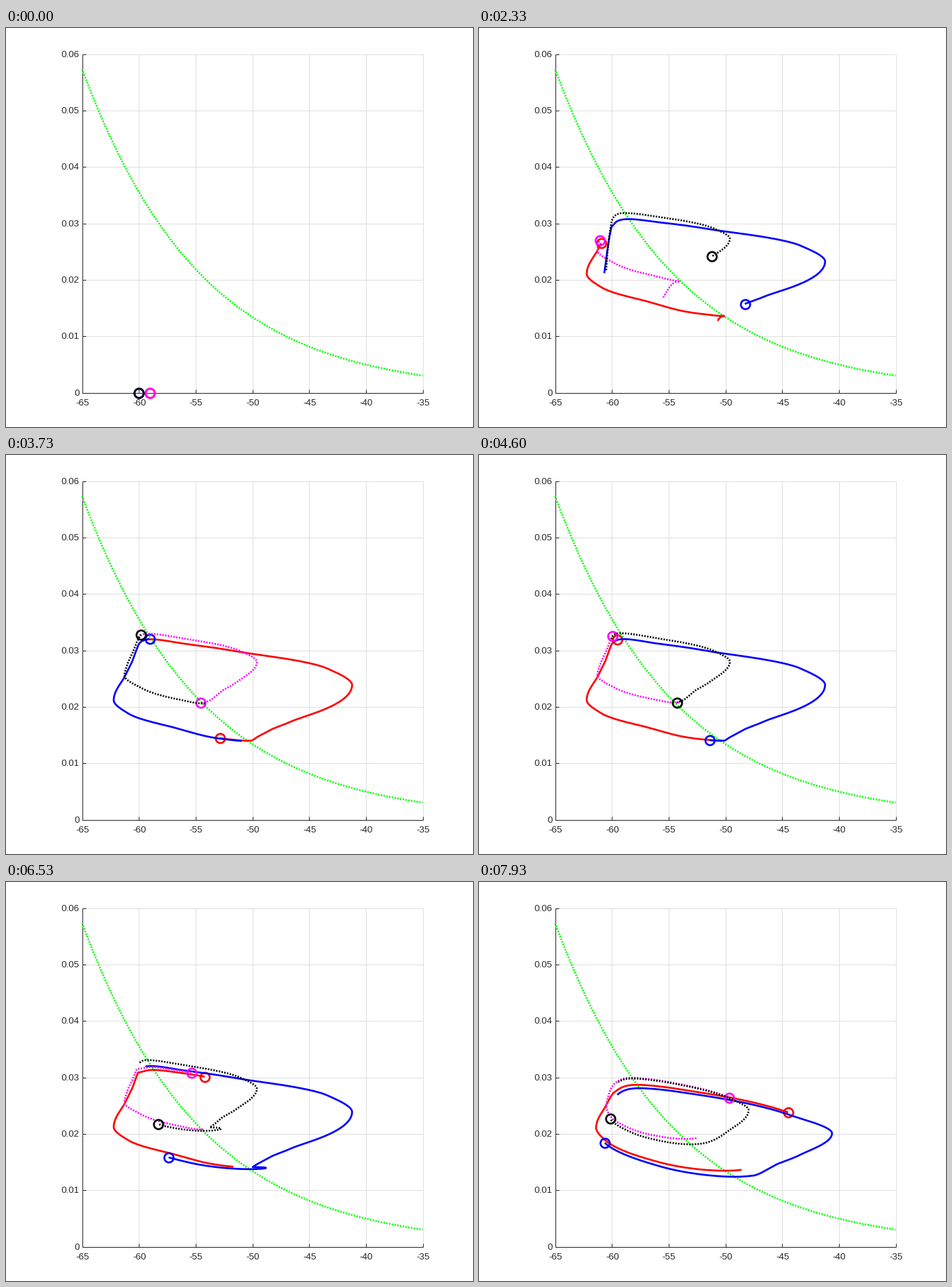
A matplotlib script that plays this animation: 672 by 575 pixels, repeating every 8000 ms.

```python
import math
import numpy as np
import matplotlib.pyplot as plt
from matplotlib.animation import FuncAnimation

W, H, DPI = 672, 575, 100
PX = 72 / DPI                 # one pixel in points
STEPS, STILL, HOLD = 120, 13, 3
SUB = 40                      # samples per step
TRAIL = 15                    # steps kept visible
FIRST, HALF = 13.2, 13.8      # first role swap, time between swaps
KICK, LATE, FAST = 81.4, 90.4, 10.1
TAU = 21                      # time scale of the slow variable
INK, GRID = "#262626", "#dfdfdf"
LEFT, RIGHT, TOP, BOTTOM = 109.5, 599.5, 37.5, 525.5


def px(v):
    return LEFT + (RIGHT - LEFT) * (v + 65) / 30


def py(h):
    return BOTTOM - (BOTTOM - TOP) * h / .06


def volts(x):
    return (x - LEFT) * 30 / (RIGHT - LEFT) - 65


def rest(v):
    """Resting level of the slow variable: the green curve."""
    return 1 / (1 + np.exp((v + 93) / 10))


def ease(*keys):
    """Monotone cubic easing through (time, x) keys."""
    t, x = np.array(keys, float).T
    h, d = np.diff(t), np.diff(x) / np.diff(t)
    m = np.zeros(len(t))
    m[0], m[-1] = d[0], d[-1]
    for i in range(1, len(d)):
        if d[i - 1] * d[i] > 0:
            m[i] = 2 * d[i - 1] * d[i] / (d[i - 1] + d[i])

    def at(s):
        i = min(max(int(np.searchsorted(t, s, side="right")) - 1, 0), len(h) - 1)
        u = min(max((s - t[i]) / h[i], 0), 1)
        v = 1 - u
        return ((1 + 2 * u) * v * v * x[i] + u * v * v * h[i] * m[i]
                + u * u * (3 - 2 * u) * x[i + 1] - u * u * v * h[i] * m[i + 1])
    return at


# Only the horizontal motion is keyed; the height follows from the slow variable.
SOLID = dict(
    ring=48,
    lead=ease((0, 207), (.2, 226), (1.1, 234), (2.6, 253), (3.8, 299),
              (4.3, 328), (5.4, 340), (FIRST, 351)),
    lag=ease((0, 191), (.2, 216), (1.7, 215), (2.6, 208), (4.6, 180),
             (5.3, 177.5), (8, 182.5), (FIRST, 191)),
    active=ease((0, 192), (1.4, 199), (2.6, 212), (4, 246), (4.9, 330), (5.6, 462),
                (6.1, 498), (7.8, 412), (8.9, 381), (11, 361), (HALF, 353)),
    passive=ease((0, 353), (1.4, 332), (2.7, 290), (4, 245), (5.3, 176),
                 (6.2, 155), (8.1, 171), (10, 182), (HALF, 192)),
    late_active=ease((0, 193), (1.9, 213), (3, 234), (4.1, 290), (5.5, 445),
                     (6.2, 508), (7.2, 463), (8.1, 427), (FAST, 396)),
    late_passive=ease((0, 396), (1.3, 355), (3.4, 262), (5.5, 181),
                      (6.4, 168.5), (8.3, 182), (FAST, 193)))

DOTTED = dict(
    ring=9,
    lead=ease((0, 207), (1.4, 210), (3.3, 238), (6.3, 262), (FIRST, 285)),
    lag=ease((0, 191), (1.7, 191), (2.6, 184.5), (4.7, 182), (FIRST, 190)),
    active=ease((0, 190), (1.4, 192), (4, 203), (5, 222), (5.8, 252), (6.9, 338),
                (7.5, 361), (8.9, 333), (10.2, 310), (HALF, 289)),
    passive=ease((0, 289), (1.4, 285), (4, 259), (6.4, 195), (7.7, 170.5),
                 (8.8, 174), (10.6, 182), (HALF, 190)),
    late_active=ease((0, 195), (2, 213), (3.2, 232), (4.2, 275), (5.5, 360),
                     (6.2, 388), (7.8, 359), (FAST, 325)),
    late_passive=ease((0, 325), (1, 304), (2.6, 262), (3.9, 222), (5.5, 189),
                      (6.5, 183.5), (8.5, 188), (FAST, 195)))


def track(cell, lead):
    """Whole path of one cell, SUB samples per step."""
    def role(turn):
        return "active" if (turn % 2 == 1) == lead else "passive"

    def swing(t):
        turn, s = divmod(t - FIRST, HALF)
        return cell[role(turn)](s)

    kicked = cell["late_" + role(-1)]
    jolt = swing(KICK) - kicked(0)

    def x_at(t):
        if t < FIRST:
            ring = cell["ring"] * math.exp(-t / .48) * math.sin(9 * t)
            return cell["lead" if lead else "lag"](t) + ring
        if t < KICK:
            return swing(t)
        if t < LATE:
            s = t - KICK
            return kicked(s * FAST / (LATE - KICK)) + jolt * math.exp(-s / .25)
        turn, s = divmod(t - LATE, FAST)
        return cell["late_" + role(turn)](s)

    x = np.array([x_at(i / SUB) for i in range((STEPS - STILL) * SUB + 1)])
    v = volts(x)
    goal = rest(v)
    gain = 1 - np.exp(-np.cosh((v + 93) / 20) / (TAU * SUB))
    h = np.zeros(len(x))
    for i in range(1, len(x)):
        h[i] = h[i - 1] + (goal[i] - h[i - 1]) * gain[i]
    return np.column_stack([x, py(h)])


fig = plt.figure(figsize=(W / DPI, H / DPI), dpi=DPI, facecolor="white")
ax = fig.add_axes([0, 0, 1, 1])
ax.set_xlim(0, W)
ax.set_ylim(H, 0)
ax.axis("off")


def rule(x, y, color, z):
    ax.plot(x, y, color=color, lw=PX, zorder=z, snap=True, solid_capstyle="butt")


def label(x, y, s, ha):
    ax.text(x, y, s, ha=ha, va="center", color=INK,
            family="Liberation Sans", size=13.33 * PX)


for v in range(-65, -34, 5):
    x = px(v)
    rule([x, x], [TOP, BOTTOM], GRID, 1)
    rule([x, x], [BOTTOM - 5, BOTTOM], INK, 2)
    label(x + .5, 541.3, str(v), "center")
for n in range(7):
    y = py(n / 100)
    rule([LEFT, RIGHT], [y, y], GRID, 1)
    rule([LEFT, LEFT + 5], [y, y], INK, 2)
    label(105.5, y + 1.3, f"{n / 100:.2f}" if n else "0", "right")
rule([LEFT, LEFT], [TOP, BOTTOM], INK, 2)
rule([LEFT, RIGHT], [BOTTOM, BOTTOM], INK, 2)

LINE = dict(lw=2.67 * PX, solid_joinstyle="round", dash_joinstyle="round",
            dash_capstyle="butt", solid_capstyle="butt")
DOTS = (0, (.75, .75))

sweep = np.linspace(-65, -35, 200)
ax.plot(px(sweep), py(rest(sweep)), color="#00ff00", ls=DOTS, zorder=3, **LINE)

cells = []
for z, (color, cell, lead, style) in enumerate([
        ("#ff0000", SOLID, True, "-"), ("#0000ff", SOLID, False, "-"),
        ("#ff00ff", DOTTED, True, DOTS), ("#000000", DOTTED, False, DOTS)]):
    trail, = ax.plot([], [], color=color, ls=style, zorder=4 + z, **LINE)
    ring, = ax.plot([], [], "o", mfc="none", mec=color, ms=13.33 * PX,
                    mew=2.67 * PX, zorder=4.5 + z)
    cells.append((track(cell, lead), trail, ring))


def draw(frame):
    step = min((frame + 1) // HOLD, STEPS - 1)
    end = max(0, step - STILL) * SUB
    tail = max(0, end - TRAIL * SUB)
    artists = []
    for path, trail, ring in cells:
        trail.set_data(*path[tail:end + 1].T)
        ring.set_data(*path[end:end + 1].T)
        artists += [trail, ring]
    return artists


anim = FuncAnimation(fig, draw, frames=STEPS * HOLD, interval=8000 / (STEPS * HOLD),
                     repeat=True, repeat_delay=0, blit=False)
plt.show()
```
